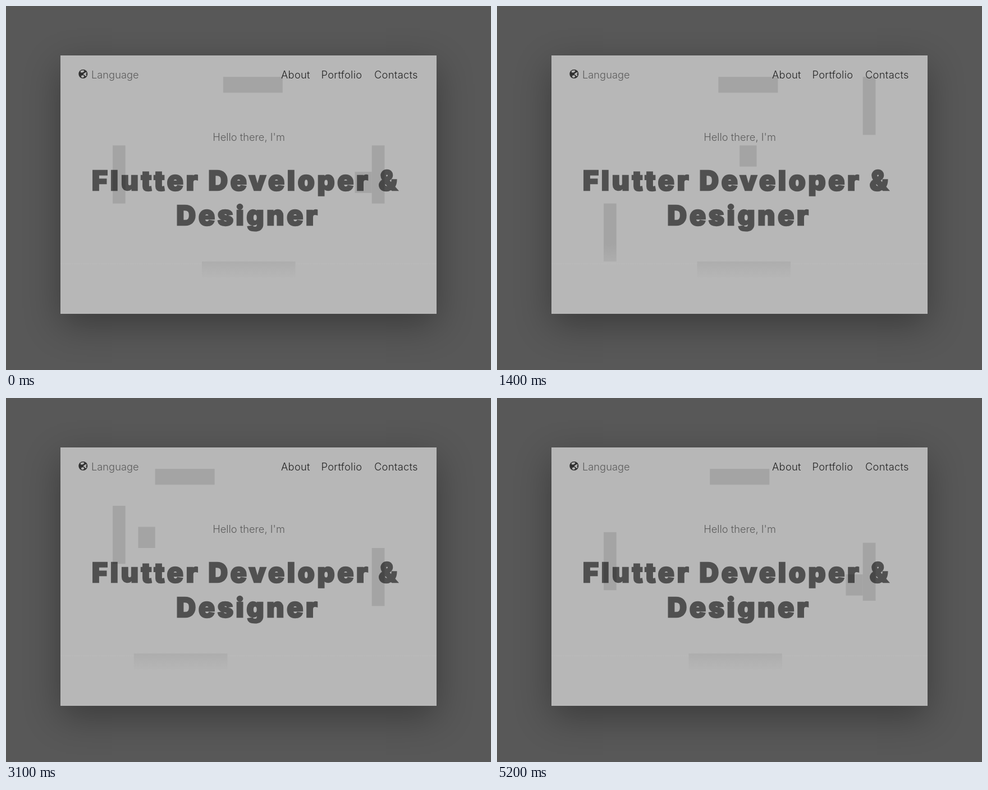
An HTML page that plays this animation: 864 by 648 pixels, repeating every 5.3 s.

```html
<!DOCTYPE html>
<html lang="en">
<head>
<meta charset="utf-8">
<title>Portfolio hero</title>
<style>
  html, body { margin: 0; width: 100%; height: 100%; overflow: hidden; background: #585858; }
  .card {
    position: absolute; left: 97px; top: 88px; width: 670px; height: 460px;
    background: #b7b7b7; box-shadow: 0 20px 60px rgba(0, 0, 0, .33);
  }
  svg { position: absolute; left: 0; top: 0; display: block; }
  text { font-family: Inter, "Open Sans", sans-serif; font-size: 18.3px; font-weight: 300; }
  .menu { fill: #242424; letter-spacing: .3px; }
  .soft { fill: #5c5c5c; }
  .mid { text-anchor: middle; }
  .title { opacity: .56; }
  .title text {
    font-size: 48px; font-weight: 900; letter-spacing: 4.7px;
    stroke: #000; stroke-width: 2.4px;
  }
</style>
</head>
<body>
<div class="card"></div>
<svg width="864" height="648" viewBox="0 0 864 648">
  <defs>
    <linearGradient id="fade" gradientUnits="userSpaceOnUse" x1="0" y1="424" x2="0" y2="487">
      <stop offset="0" stop-color="#b7b7b7" stop-opacity="0"/>
      <stop offset="1" stop-color="#b7b7b7"/>
    </linearGradient>
  </defs>
  <rect x="97" y="458" width="670" height="1.5" fill="#bdbdbd"/>
  <g id="court" fill="#a4a4a4"></g>
  <rect x="97" y="424" width="670" height="124" fill="url(#fade)"/>

  <circle cx="137.3" cy="121" r="8" fill="#303030"/>
  <g fill="#b7b7b7">
    <path d="M133 115.5l4.500-1.200 2.200 1.500-2.200 2.300-3 .7-1.800-1z"/>
    <path d="M138.500 120.300l3.500-2.300 2 .8-1.700 2.500 1.300 2.200-2.100 1.700-1.500-2.400-2.300-.6z"/>
    <path d="M133.500 124.500l3.600-1.500 2.400 2-1.400 2.200-3 .2z"/>
  </g>
  <text class="soft" x="152" y="129">Language</text>
  <text class="menu" x="490" y="129">About</text>
  <text class="menu" x="561.500" y="129">Portfolio</text>
  <text class="menu" x="656" y="129">Contacts</text>
  <text class="soft mid" x="432.500" y="240">Hello there, I'm</text>
  <g class="title">
    <text x="153" y="327.500">Flutter Developer &amp;</text>
    <text x="303.500" y="389.500">Designer</text>
  </g>
</svg>
<script>
  const STEP = 100, STEPS = 53;
  const CELL_W = 7.57, CELL_H = 9.39, LEFT = 190, TOP = 116.8;

  // Ball bounces: [step, column, row]
  const PATH = [
    [0, 57, 19], [9, 42, 4], [23, 14, 32], [34, 3, 5], [35, 6, 4], [52, 57, 21]
  ];
  const court = document.getElementById('court');

  // Makes a block sized in cells and returns its mover.
  function block(cols, rows) {
    const el = document.createElementNS('http://www.w3.org/2000/svg', 'rect');
    el.setAttribute('width', cols * CELL_W);
    el.setAttribute('height', rows * CELL_H);
    court.append(el);
    return (col, row) => {
      el.setAttribute('x', LEFT + col * CELL_W);
      el.setAttribute('y', TOP + row * CELL_H);
    };
  }

  const left = block(3, 11), right = block(3, 11);
  const upper = block(14, 3), lower = block(22, 3);
  const ball = block(4, 4);

  // Triangle wave from 0 to 26 and back in 52 ticks, highest at peak.
  function sweep(tick, peak) {
    const d = Math.abs(tick - peak);
    return 26 - Math.min(d, 52 - d);
  }

  function ballAt(step) {
    const i = Math.max(1, PATH.findIndex(p => p[0] >= step));
    const [t0, c0, r0] = PATH[i - 1], [t1, c1, r1] = PATH[i];
    const k = (step - t0) / (t1 - t0);
    return [c0 + (c1 - c0) * k, r0 + (r1 - r0) * k].map(Math.round);
  }

  function draw(step) {
    const tick = Math.max(0, step - 1);
    left(0, sweep(tick, 12));
    right(61, sweep(tick, 40));
    upper(7 + sweep(tick, 7), 1);
    lower(2 + sweep(tick, 7), 36);
    ball(...ballAt(step));
  }

  const start = performance.now();
  function loop() {
    const t = Math.max(0, performance.now() - start);
    draw(Math.floor(t / STEP) % STEPS);
    requestAnimationFrame(loop);
  }
  loop();
</script>
</body>
</html>
```
